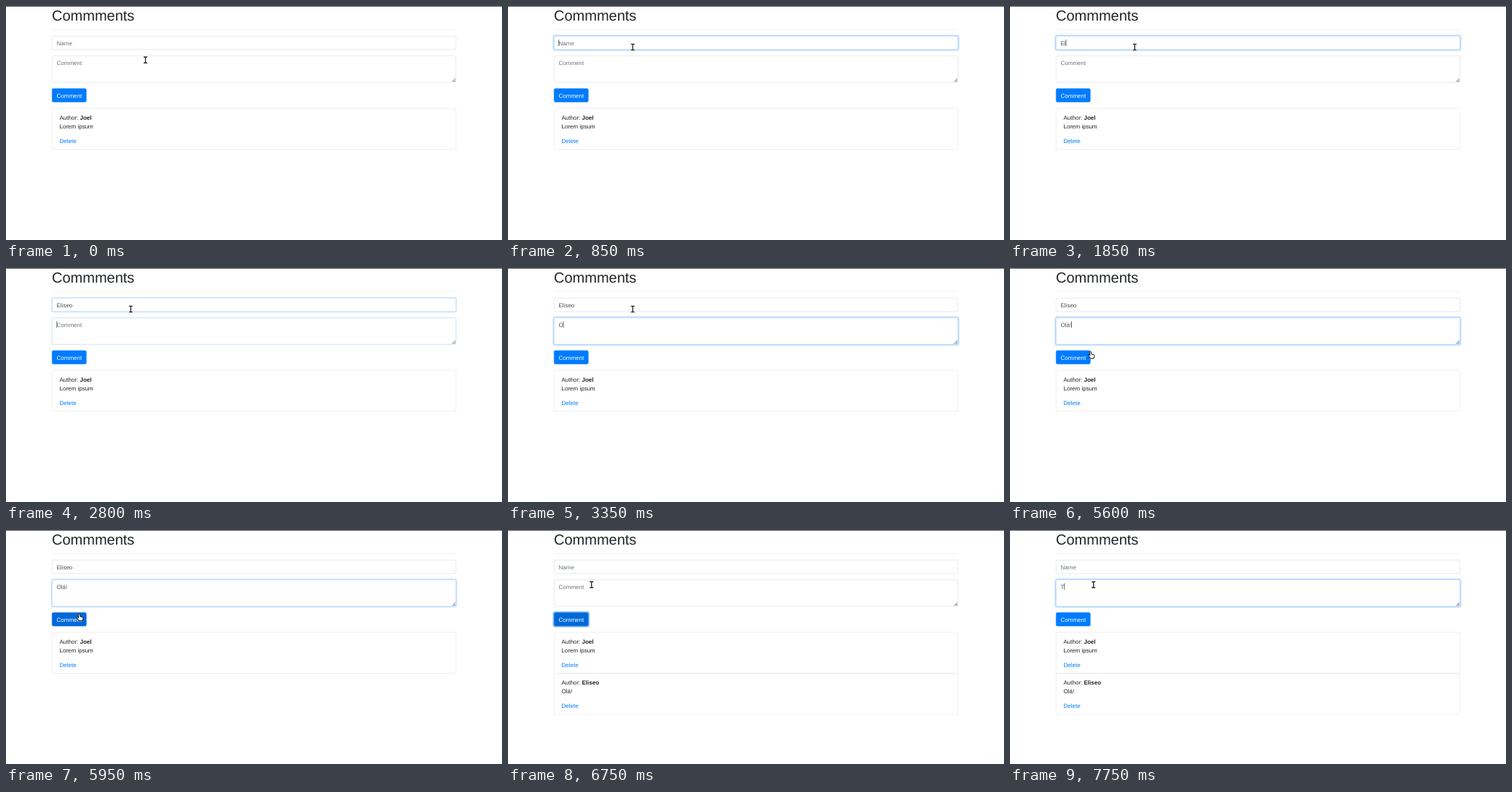
Animation, 681 px wide and 321 px high, one loop 8000 ms. Source, as an HTML page:

```html
<!DOCTYPE html>
<html lang="en">
<head>
<meta charset="utf-8">
<title>Comments</title>
<style>
html, body { margin: 0; width: 100%; height: 100%; overflow: hidden; background: #fff; }
svg { display: block; }
text { font: 16px "Liberation Sans", Arial, sans-serif; fill: #212529; text-rendering: geometricPrecision; }
.title { font-size: 40px; }
.bold { font-weight: 700; }
.link { fill: #007bff; }
.item { fill: none; stroke: #dfdfdf; }
.ring { fill: none; }
</style>
</head>
<body>
<svg width="681" height="321" viewBox="0 0 1362 642">
  <rect width="1362" height="642" fill="#fff"/>
  <rect width="1362" height="2" fill="#5c5c5c"/>
  <text class="title" x="126" y="39">Commments</text>
  <rect x="126" y="65" width="1110" height="1" fill="#e5e5e5"/>

  <g id="name"></g>
  <g id="comment"></g>
  <path d="M1234 197V208H1223Z" fill="#bdbdbd"/>

  <rect id="btnRing" class="ring" stroke="#268fff"/>
  <rect id="btn" x="126.5" y="226.5" width="94" height="37" rx="4"/>
  <text x="139" y="251" style="fill:#fff">Comment</text>

  <g id="list"></g>

  <g id="cursor" stroke-linejoin="round" stroke-linecap="round">
    <g id="beam" fill="none">
      <path d="M-4 -8H4M0 -8V8M-4 8H4" stroke="#fff" stroke-width="5" opacity=".8"/>
      <path d="M-4 -8H-1L0 -7L1 -8H4M0 -7V7M-4 8H-1L0 7L1 8H4" stroke="#222" stroke-width="2.6"/>
    </g>
    <path id="arrow" d="M0 0V17L4 13.5L7.500 20.500L10.500 19L7.500 12.500H12.500Z"
          fill="#fff" stroke="#111" stroke-width="2"/>
    <path id="hand" d="M-2 0Q0 -2 2 0V6L9 8Q11 9 11 11L9 18H0L-6 10Q-6 7 -4 8L-2 10Z"
          fill="#fff" stroke="#111" stroke-width="2"/>
  </g>
</svg>
<script>
const LOOP = 8000, STEP = 50, FADE = 150;
const $ = id => document.getElementById(id);

function add(parent, tag, attrs, text) {
  const el = document.createElementNS("http://www.w3.org/2000/svg", tag);
  for (const key in attrs) el.setAttribute(key, attrs[key]);
  if (text) el.textContent = text;
  parent.appendChild(el);
  return el;
}

function set(el, attrs) {
  for (const key in attrs) el.setAttribute(key, attrs[key]);
}

// Smooth 0..1 change lasting FADE ms
function fade(t, start) {
  const p = Math.min(1, Math.max(0, (t - start) / FADE));
  return p * p * (3 - 2 * p);
}

// Strength of a state held during [from, to] spans
const level = (t, spans) =>
  spans.reduce((sum, [from, to]) => sum + fade(t, from) - fade(t, to), 0);

const mix = (a, b, p) =>
  `rgb(${a.map((v, i) => Math.round(v + (b[i] - v) * p)).join()})`;

function drawRing(el, x, y, w, h, p, alpha) {
  const s = 3.2 * p;
  set(el, {
    x: x - s / 2, y: y - s / 2, width: w + s, height: h + s, rx: 4 + s / 2,
    "stroke-width": s, "stroke-opacity": alpha * p
  });
}

function makeField(id, y, h, hint, typed, spans) {
  const g = $(id);
  const ring = add(g, "rect", { class: "ring", stroke: "#007bff" });
  const box = add(g, "rect", { x: 126.5, y: y + .5, width: 1109, height: h - 1, rx: 4, fill: "#fff" });
  const label = add(g, "text", { x: 139, y: y + 25 });
  const caret = add(g, "rect", { y: y + 10, width: 1.4, height: 18, fill: "#333" });
  return t => {
    const focus = level(t, spans);
    const last = typed.filter(([at]) => at <= t).pop();
    const value = last ? last[1] : "";
    drawRing(ring, 126, y, 1110, h, focus, .25);
    box.setAttribute("stroke", mix([206, 212, 218], [128, 189, 255], focus));
    label.textContent = value || hint;
    label.style.fill = value ? "#495057" : "#6c757d";
    const active = spans.some(([from, to]) => t >= from && t < to - 10);
    caret.setAttribute("visibility", active ? "visible" : "hidden");
    caret.setAttribute("x", 139 + (value ? label.getComputedTextLength() : 0));
  };
}

function makeItem(y, author, body) {
  const g = add($("list"), "g", {});
  add(g, "rect", { class: "item", x: 126.5, y: y + .5, width: 1109, height: 113, rx: 3 });
  const line = add(g, "text", { x: 147, y: y + 31 }, "Author: ");
  add(line, "tspan", { class: "bold" }, author);
  add(g, "text", { x: 147, y: y + 55 }, body);
  add(g, "text", { class: "link", x: 147, y: y + 95 }, "Delete");
  return g;
}

const POSTED = 6100;
const drawName = makeField("name", 82, 38, "Name",
  [[1400, "E"], [1850, "El"], [2000, "Eli"], [2100, "Elis"], [2200, "Elise"], [2350, "Eliseo"], [POSTED, ""]],
  [[710, 2740]]);
const drawComment = makeField("comment", 136, 74, "Comment",
  [[3350, "O"], [3600, "Ol"], [3950, "Olá"], [4550, "Olá!"], [POSTED, ""], [7750, "T"]],
  [[2740, 5910], [6930, 9000]]);
makeItem(280, "Joel", "Lorem ipsum");
const reply = makeItem(393, "Eliseo", "Olá!");

// Pointer: time, x, y
const path = [
  [0, 191.5, 74], [400, 171.3, 59], [500, 171.3, 59], [550, 171.3, 56.3],
  [5150, 171.3, 56.3], [5200, 174.3, 104.9], [5600, 110.5, 115], [5750, 100.5, 115.5],
  [6150, 100.5, 115.5], [6600, 114, 74.7], [6700, 114, 74.7], [6750, 114.7, 75], [LOOP, 114.7, 75]
];

function pointerAt(t) {
  const i = Math.max(1, path.findIndex(k => k[0] >= t));
  const [t0, x0, y0] = path[i - 1], [t1, x1, y1] = path[i];
  const p = (t - t0) / (t1 - t0);
  return [x0 + (x1 - x0) * p, y0 + (y1 - y0) * p];
}

function shapeAt(x, y) {
  if ((y >= 41 && y <= 60) || (y >= 68 && y <= 104.7)) return "beam";
  return x < 111 && y >= 113 && y <= 132 ? "hand" : "arrow";
}

function drawButton(t) {
  const hot = level(t, [[5590, 6930]]);
  set($("btn"), {
    fill: mix([0, 123, 255], [0, 105, 217], hot),
    stroke: mix([0, 123, 255], [0, 98, 204], hot)
  });
  drawRing($("btnRing"), 126, 226, 95, 38, level(t, [[5910, 6930]]), .5);
}

function drawCursor(t) {
  const [x, y] = pointerAt(t), shape = shapeAt(x, y);
  for (const id of ["beam", "arrow", "hand"])
    $(id).setAttribute("visibility", id === shape ? "visible" : "hidden");
  $("cursor").setAttribute("transform", `translate(${x * 2} ${y * 2})`);
}

function render(ms) {
  const t = Math.floor((ms % LOOP) / STEP) * STEP;
  drawName(t);
  drawComment(t);
  drawButton(t);
  reply.setAttribute("visibility", t >= POSTED ? "visible" : "hidden");
  drawCursor(t);
}

const start = performance.now();
function tick() {
  render(performance.now() - start);
  requestAnimationFrame(tick);
}
tick();
</script>
</body>
</html>
```
